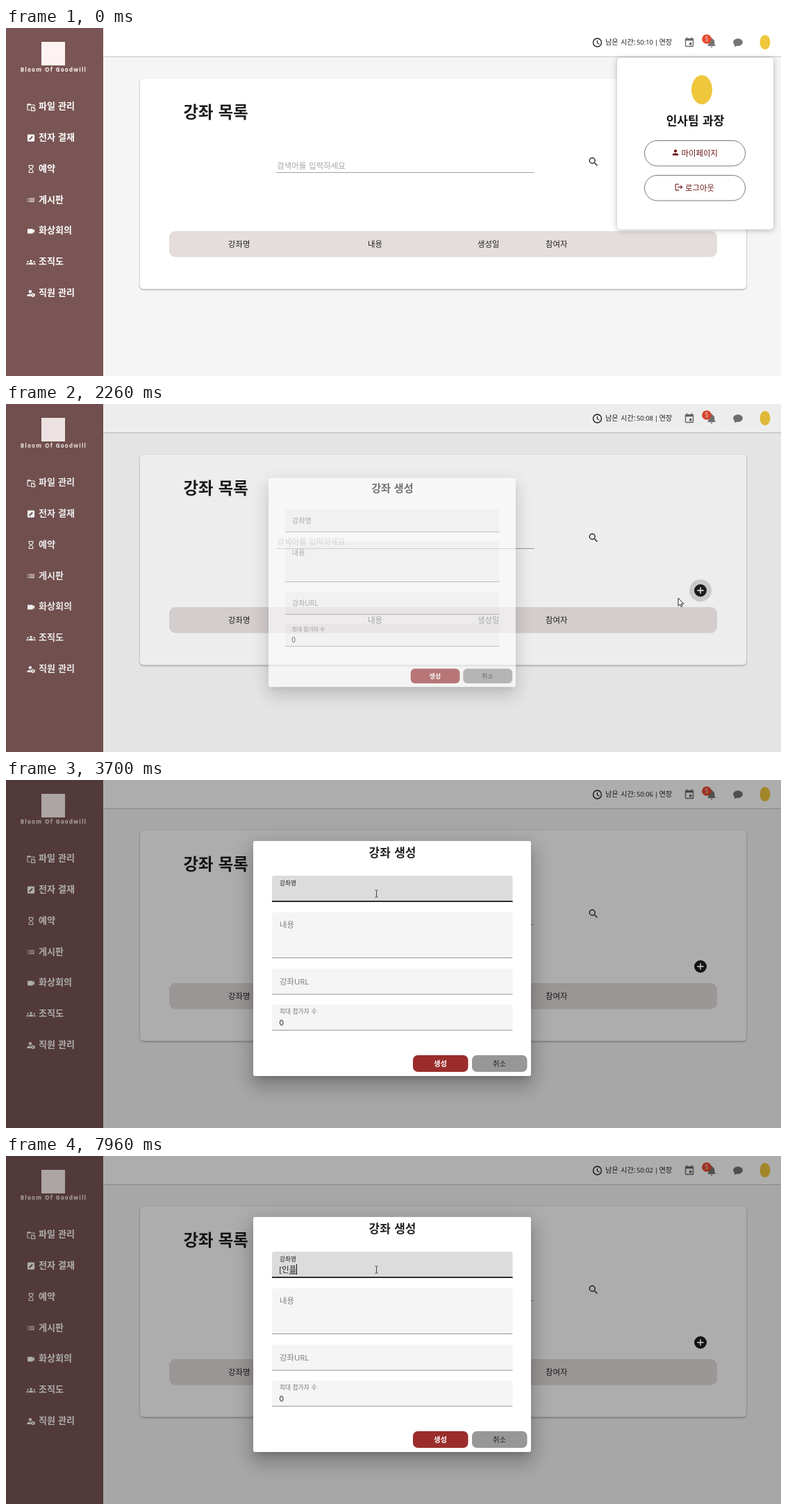
These frames come from a looping animation (1116 px wide and 502 px high, 8 s). An HTML page:

```html
<!DOCTYPE html>
<html lang="ko">
<head>
<meta charset="utf-8">
<title>강좌 목록</title>
<style>
  html, body { margin: 0; width: 1116px; height: 502px; overflow: hidden; background: #f5f5f5; }
  svg { position: absolute; left: 0; top: 0; display: block; }
  text { font-family: "Noto Sans", "Noto Sans CJK KR", "Noto Sans CJK JP", sans-serif; word-spacing: .06em; white-space: pre; }
  .b { font-weight: 700; }
  .m { font-weight: 500; }
  .c { text-anchor: middle; }
  .card { filter: drop-shadow(0 1px 1.2px rgba(0, 0, 0, .38)); }
  .pop { filter: drop-shadow(0 1px 4px rgba(0, 0, 0, .28)); }
  #shade { position: absolute; inset: 0; background: #000; }
  #dialog {
    position: absolute; left: 356px; top: 88px; width: 400px; height: 339px;
    background: #fff; border-radius: 3px;
    box-shadow: 0 7px 10px -5px rgba(0, 0, 0, .2), 0 16px 25px 2px rgba(0, 0, 0, .14), 0 6px 30px 5px rgba(0, 0, 0, .12);
  }
</style>
</head>
<body>
<svg id="page" width="1116" height="502"></svg>
<div id="shade"></div>
<div id="dialog"><svg id="form" width="400" height="339" viewBox="356 88 400 339"></svg></div>
<svg id="pointer" width="1116" height="502">
  <path id="arrow" d="M0 0v11.2l2.6-2.4 1.6 3.7 1.8-.8-1.6-3.5h3.5z" fill="#fff" stroke="#111" stroke-width=".9"/>
  <path id="hand" d="M-1 1a1.1 1.1 0 0 1 2.2 0v4.4l4 .8q1.5.4 1.4 1.9l-.6 3.4-.8 2.3H.2L-3 9.4q-.6-1.3.7-1.4l1.3 1z" fill="#fff" stroke="#111" stroke-width=".9"/>
  <path id="beam" d="M-2-5h1.5l.5.5.5-.5H2M0-4.5v9M-2 5h1.5l.5-.5.5.5H2" fill="none" stroke="#333" stroke-width=".9"/>
</svg>
<script>
const LOOP = 8000, STEP = 68.2, START = 190;
const $ = id => document.getElementById(id);

const ICONS = {
  folder: 'M10 19H4V8h16v3h2V8c0-1.1-.9-2-2-2h-8l-2-2H4c-1.1 0-2 .9-2 2v13c0 1.1.9 2 2 2h6zM12 12v11h11v-7l-4-4zm2 2h4v3h3v4h-7z',
  edit: 'M5 3h14a2 2 0 0 1 2 2v14a2 2 0 0 1-2 2H5a2 2 0 0 1-2-2V5a2 2 0 0 1 2-2zM7 17h2.5L17 9.5 14.5 7 7 14.5z',
  hourglass: 'M6 2v6l4 4-4 4v6h12v-6l-4-4 4-4V2zm10 14.5V20H8v-3.5l4-4zM12 11.5l-4-4V4h8v3.5z',
  list: 'M3 13h2v-2H3zm0 4h2v-2H3zm0-8h2V7H3zm4 4h14v-2H7zm0 4h14v-2H7zM7 7v2h14V7z',
  video: 'M17 10.5V7c0-.55-.45-1-1-1H4c-.55 0-1 .45-1 1v10c0 .55.45 1 1 1h12c.55 0 1-.45 1-1v-3.5l4 4v-11z',
  groups: 'M9 9a3 3 0 1 0 6 0 3 3 0 1 0-6 0M6 18v-1.6c0-5 12-5 12 0V18zM2 11a2 2 0 1 0 4 0 2 2 0 1 0-4 0M0 18v-1.6q.5-2.4 5-2.4-.6 1-.6 4zM18 11a2 2 0 1 0 4 0 2 2 0 1 0-4 0M24 18v-1.6q-.5-2.4-5-2.4.6 1 .6 4z',
  manage: 'M6 8a4 4 0 1 0 8 0 4 4 0 1 0-8 0M2 20v-2.5C2 14.800 7 14 11 14q-1 3 1 6zM16 11.500h2l.4 1.500 1.600.800 1.600-.500 1 1.700-1.200 1.500 1.200 2-1 1.700-1.600-.500-1.600.800-.4 1.500h-2l-.4-1.500-1.600-.800-1.600.500-1-1.700 1.200-2-1.200-1.500 1-1.700 1.600.500 1.600-.800zM15.300 16.500a1.700 1.700 0 1 0 3.400 0 1.700 1.700 0 1 0-3.400 0',
  clock: 'M2 12a10 10 0 1 0 20 0 10 10 0 1 0-20 0M4 12a8 8 0 1 1 16 0 8 8 0 1 1-16 0M12.800 7H11v6l5.200 3.100.8-1.200-4.200-2.600z',
  event: 'M17 12h-5v5h5zM16 1v2H8V1H6v2H5a2 2 0 0 0-2 2v14a2 2 0 0 0 2 2h14a2 2 0 0 0 2-2V5a2 2 0 0 0-2-2h-1V1zm3 18H5V8h14z',
  bell: 'M12 22c1.100 0 2-.900 2-2h-4c0 1.100.890 2 2 2zm6-6v-5c0-3.070-1.640-5.640-4.500-6.320V4c0-.830-.670-1.500-1.500-1.500s-1.500.670-1.500 1.500v.680C7.630 5.360 6 7.920 6 11v5l-2 2v1h16v-1z',
  chat: 'M12 3.500c5.500 0 10 3.400 10 7.800s-4.500 7.800-10 7.800q-1.500 0-3-.300-2 2-5 2 1.200-1.700 1-4-3-2.200-3-5.500c0-4.400 4.500-7.800 10-7.800z',
  search: 'M15.500 14h-.800l-.300-.300A6.500 6.500 0 1 0 13.700 14.400l.300.300v.800l5 5 1.500-1.500zM9.500 14a4.500 4.500 0 1 1 0-9 4.500 4.500 0 0 1 0 9z',
  add: 'M2 12a10 10 0 1 0 20 0 10 10 0 1 0-20 0M17 13h-4v4h-2v-4H7v-2h4V7h2v4h4z',
  person: 'M8 8a4 4 0 1 0 8 0 4 4 0 1 0-8 0M12 14c-2.700 0-8 1.300-8 4v2h16v-2c0-2.700-5.300-4-8-4z',
  logout: 'M17 7l-1.400 1.400L18.200 11H8v2h10.200l-2.600 2.600L17 17l5-5zM4 5h8V3H4a2 2 0 0 0-2 2v14a2 2 0 0 0 2 2h8v-2H4z'
};

// Text is placed by its vertical centre.
const text = (x, cy, size, str, cls = '', fill = '#222', more = '') =>
  `<text x="${x}" y="${cy + size * .37}" font-size="${size}" class="${cls}" fill="${fill}" ${more}>${str}</text>`;
const icon = (name, cx, cy, size, fill) =>
  `<path d="${ICONS[name]}" fill="${fill}" fill-rule="evenodd" transform="translate(${cx - size / 2} ${cy - size / 2}) scale(${size / 24})"/>`;
const rect = (x, y, w, h, r, fill, more = '') =>
  `<rect x="${x}" y="${y}" width="${w}" height="${h}" rx="${r}" fill="${fill}" ${more}/>`;
const oval = (cx, cy, rx, ry) => `<ellipse cx="${cx}" cy="${cy}" rx="${rx}" ry="${ry}" fill="#efc73c"/>`;

const NAV = [['folder', '파일 관리'], ['edit', '전자 결재'], ['hourglass', '예약'], ['list', '게시판'],
  ['video', '화상회의'], ['groups', '조직도'], ['manage', '직원 관리']];
const COLUMNS = [[320, '강좌명'], [521, '내용'], [679, '생성일'], [777, '참여자']];

function pill(y, name, iconX, label, labelX) {
  return rect(919.5, y + .5, 145, 36.5, 18.2, '#fff', 'stroke="#777"') +
    icon(name, iconX, y + 17.500, 13, '#6d1717') + text(labelX, y + 18.500, 11.4, label, 'm', '#6d1717');
}

$('page').innerHTML =
  rect(0, 0, 1116, 502, 0, '#f5f5f5') +
  rect(140, 0, 976, 41, 0, '#fff') + rect(140, 41, 976, 1, 0, '#c2c2c2') +
  rect(0, 0, 140, 502, 0, '#7a5555') +
  rect(51, 20, 34, 34, 0, '#fdf3f2') +
  text(68.5, 60.5, 8, 'Bloom Of Goodwill', 'b c', '#fdf3f2', 'letter-spacing="1.2"') +
  NAV.map(([name, label], i) => {
    const y = 112.3 + i * 44.8;
    return icon(name, 36, y + 1.5, 13.5, '#fff') + text(47, y, 13, label, 'b', '#fff');
  }).join('') +
  icon('clock', 851.5, 21, 16, '#1a1a1a') +
  text(863, 20.5, 10.2, '남은 시간:') +
  text(908, 20.5, 9.4, '', '', '#222', 'id="timer"') +
  text(934, 20.5, 9.4, '|') + text(940.5, 20.5, 10.2, '연장') +
  icon('event', 984, 21, 16.5, '#6b6b6b') +
  icon('bell', 1016, 21, 17.5, '#757575') +
  '<circle cx="1009" cy="16" r="6.8" fill="#e5492f"/>' + text(1009, 16, 8, '5', 'c', '#fff') +
  icon('chat', 1054, 21, 16.5, '#757575') +
  oval(1093, 20.5, 7.5, 10.500) +
  rect(193, 73, 873, 303.5, 5, '#fff', 'class="card"') +
  text(255.5, 121.5, 23.3, '강좌 목록', 'b', '#1c1c1c') +
  text(390, 198.5, 11.5, '검색어를 입력하세요', '', '#a6a6a6') +
  rect(389.5, 208, 371, 1, 0, '#a0a0a0') +
  icon('search', 846, 193, 17, '#222') +
  '<circle id="ring" cx="1000" cy="269" r="16"/>' +
  icon('add', 1000, 269, 21.6, '#1e1e1e') +
  rect(235, 293, 789, 37.5, 9, '#e4dddc') +
  COLUMNS.map(([x, label]) => text(x, 312, 11.4, label, 'm')).join('') +
  '<g id="menu">' +
  rect(880, 43, 225, 247.5, 5, '#fff', 'class="pop"') +
  oval(1002, 89, 15, 21) +
  text(992.5, 133.5, 17, '인사팀 과장', 'b c', '#161616') +
  pill(162, 'person', 964, '마이페이지', 972.5) +
  pill(212, 'logout', 969, '로그아웃', 978) +
  '</g>';

const field = (y, h) =>
  `<path d="M383 ${y + h}v${3 - h}q0-3 3-3h340.500q3 0 3 3v${h - 3}z" fill="#f5f5f5"/>` +
  rect(383, y + h - 1, 346.5, 1, 0, '#949494');

$('form').innerHTML =
  text(556.5, 105, 17, '강좌 생성', 'b c') +
  field(138, 38) + field(191, 66) + field(272, 37.5) + field(324, 37.5) +
  rect(383, 138, 346.5, 38, 3, '#000', 'id="tint"') +
  rect(383, 174.2, 346.5, 1.8, 0, '#1a1a1a', 'id="line"') +
  text(394, 157, 11.4, '강좌명', '', '#808080', 'id="label"') +
  text(394, 209, 11.4, '내용', '', '#808080') +
  text(394, 291, 11.4, '강좌URL', '', '#808080') +
  text(394, 334, 8.7, '최대 참가자 수', '', '#777') +
  text(393.5, 350, 11.3, '0') +
  text(393.2, 163.5, 11.6, '[', '', '#222', 'id="bracket"') +
  text(397, 163.5, 11.6, '', '', '#222', 'id="typed"') +
  rect(397, 169.5, 11, 1, 0, '#333', 'id="compose"') +
  rect(393, 156, 1, 15, 0, '#111', 'id="caret"') +
  rect(586, 397, 79.5, 24, 7, '#9b2c2c') + text(625.5, 409.3, 10.3, '생성', 'b c', '#fff') +
  rect(671, 397, 79.5, 24, 7, '#979797') + text(710.5, 409.3, 10.3, '취소', 'm c');

const PATH = [[190, 1048, 492], [400, 1050, 430], [670, 1056, 300], [940, 1063, 180], [1100, 1076, 80],
  [1280, 1092, 24], [1554, 1094, 21], [1700, 1072, 90], [1850, 1030, 200], [1990, 1002, 264],
  [2160, 1000, 267], [2236, 968, 280], [2304, 932.5, 289], [2372, 928, 290], [2560, 895, 305],
  [2700, 800, 375], [2800, 655, 400], [2960, 580, 260], [3090, 533.5, 164]];
const MENU = [[1420, 1], [1540, 0]];
const RING = [[1980, 0], [2060, .06], [2160, .1], [2304, .2], [2380, .2], [2570, 0]];
const SHADE = [[2190, 0], [2236, .07], [2304, .185], [2372, .28], [2440, .305], [2580, .32]];
const ZOOM = [[2200, .7], [2236, .89], [2304, .984], [2372, .996], [2440, 1]];
const FADE = [[2200, 0], [2236, .6], [2304, .95], [2372, 1]];
const TINT = [[3040, 0], [3090, .04], [3160, .04], [3290, .1]];
const FOCUS = [[3160, 0], [3300, 1]];
const BLINK = [3170, 3700, 4230, 4760, 5290, 6120, 6630, 7160, 7430];
const TYPING = [[7430, 'ㅇ'], [7535, '이'], [7640, '인'], [7745, '인ㅍ'], [7850, '인프'], [7955, '인플']];

// Linear interpolation in a table of [time, value, ...] rows.
function track(rows, t, col = 1) {
  const i = rows.findIndex(r => r[0] > t);
  if (i < 0) return rows[rows.length - 1][col];
  if (!i) return rows[0][col];
  const a = rows[i - 1], b = rows[i];
  return a[col] + (b[col] - a[col]) * (t - a[0]) / (b[0] - a[0]);
}
const inside = (x, y, l, t, r, b) => x > l && x < r && y > t && y < b;
const show = (id, on) => $(id).style.visibility = on ? 'visible' : 'hidden';
const attr = (id, values) => Object.entries(values).forEach(([k, v]) => $(id).setAttribute(k, v));

function pointerKind(x, y, t) {
  if (t >= 2200) return [[138, 176], [191, 257], [272, 309], [324, 361]]
    .some(([a, b]) => inside(x, y, 383, a, 729, b)) ? 'beam' : 'arrow';
  const onMenu = t < 1420 && (inside(x, y, 919, 162, 1065, 199) || inside(x, y, 919, 212, 1065, 249));
  return onMenu || inside(x, y, 1082, 8, 1104, 34) || inside(x, y, 984, 253, 1016, 285) ? 'hand' : 'arrow';
}

function draw(t) {
  const q = t < START ? 0 : START + Math.floor((t - START) / STEP) * STEP;
  $('timer').textContent = '50:' + String(10 - Math.floor((t + 710) / 1000)).padStart(2, '0');
  attr('menu', { opacity: track(MENU, q) });
  attr('ring', { 'fill-opacity': track(RING, q) });
  $('shade').style.opacity = track(SHADE, q);
  $('dialog').style.opacity = track(FADE, q);
  $('dialog').style.transform = `scale(${track(ZOOM, q)})`;

  const f = track(FOCUS, q), size = 11.4 - 2.7 * f;
  attr('tint', { 'fill-opacity': track(TINT, q) });
  attr('line', { opacity: f });
  attr('label', { 'font-size': size, y: 157 - 8 * f + size * .37, fill: f > .5 ? '#222' : '#808080' });

  const typed = TYPING.filter(r => r[0] <= t).map(r => r[1]).pop() || '';
  const n = typed.length, open = t >= 5560;
  $('typed').textContent = typed;
  show('bracket', open);
  show('compose', n);
  attr('compose', { x: 397 + 10.7 * (n - 1) });
  show('caret', BLINK.filter(b => b <= t).length % 2);
  attr('caret', { x: open ? 396 + 11 * n : 393 });

  const x = track(PATH, q, 1), y = track(PATH, q, 2), kind = pointerKind(x, y, q);
  ['arrow', 'hand', 'beam'].forEach(id => show(id, q && id === kind));
  attr(kind, { transform: `translate(${x} ${y})` });
}

function tick() {
  draw(performance.now() % LOOP);
  requestAnimationFrame(tick);
}
tick();
</script>
</body>
</html>
```
